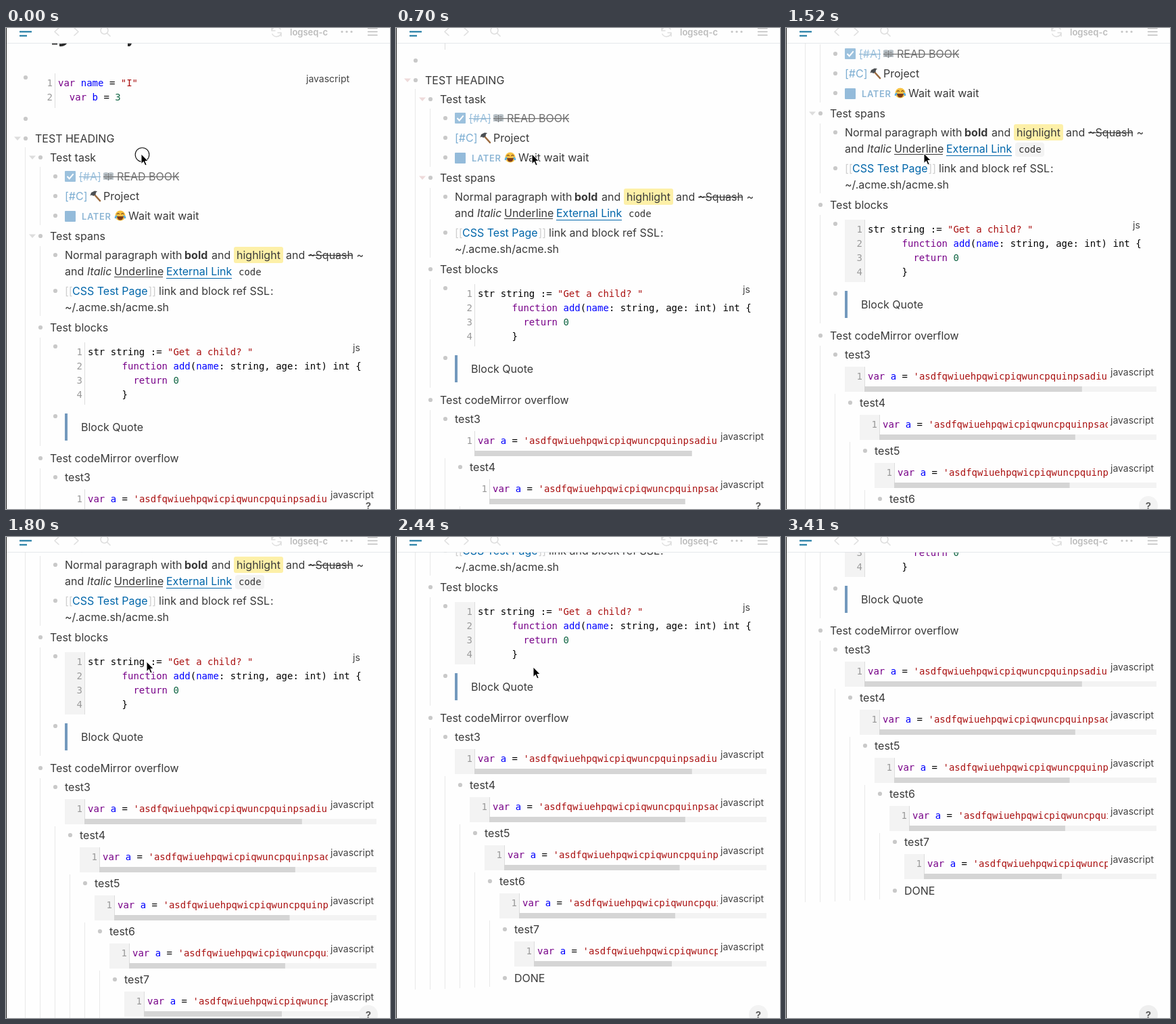
An HTML page for the animation above (3.95 s loop, 568x710 px).

```html
<!DOCTYPE html>
<html lang="en">
<head>
<meta charset="utf-8">
<title>Outline scroll</title>
<style>
  html, body { margin: 0; width: 100%; height: 100%; overflow: hidden; background: #fefefe; }
  svg { display: block; width: 568px; height: 710px; }
  text { white-space: pre; font: 16px Inter, sans-serif; fill: #3a3a3a; }
  .code { font: 14px "DejaVu Sans Mono", monospace; fill: #000; }
  .num { fill: #999; }
  .k { fill: #708; }
  .d { fill: #00f; }
  .s { fill: #a11; }
  .n { fill: #164; }
  .lang { font-size: 14px; fill: #444; }
  .link { fill: #06a; }
  .tag { fill: #7badd2; }
  .done { fill: #9cc1dd; }
  .dim { fill: #6f6f6f; }
  .faint { fill: #cfcfcf; }
  .bold { font-weight: 700; }
  .ital { font-style: italic; }
  .later { font-size: 13px; font-weight: 600; letter-spacing: .6px; fill: #8db6d5; }
  .soft { fill: none; }
  .shaded .soft { fill: #f3f3f3; }
  .fold { fill: #ddd; }
  .pink .fold { fill: #eedada; }
</style>
</head>
<body>
<svg id="stage" viewBox="0 0 568 710">
  <rect width="568" height="710" fill="#fefefe"/>
  <g id="page"></g>
  <g id="bar" fill="none" stroke-width="1.5" stroke-linecap="round" stroke-linejoin="round">
    <rect width="568" height="22" fill="#fefefe"/>
    <rect y="22" width="568" height="1" fill="#dfe3e6" fill-opacity=".8"/>
    <path d="M20 5.5H38M20 11.5H31" stroke="#0f719b" stroke-width="2" stroke-linecap="butt"/>
    <g stroke="#dedede">
      <path d="M78 0L72 5.5L78 11M101 0L107 5.5L101 11"/>
      <circle cx="145.5" cy="3.5" r="5.5"/>
      <path d="M149.5 7.5L154 12"/>
      <path d="M393 4A7 7 0 0 1 406 2M407 7A7 7 0 0 1 394 9M393 -1V4H398M407 12V7H402"/>
    </g>
    <text x="420" y="11" style="font-size:13px;font-weight:600;fill:#bcbcbc">logseq-c</text>
    <g fill="#c6c6c6"><circle cx="497" cy="5.5" r="1.6"/><circle cx="504" cy="5.5" r="1.6"/><circle cx="511" cy="5.5" r="1.6"/></g>
    <path d="M535.5 .5H549M535.5 5.5H549M535.5 10.5H549" stroke="#bdbdbd"/>
  </g>
  <circle id="help" class="soft" cx="536" cy="705" r="14"/>
  <text x="536" y="711" text-anchor="middle" class="bold" style="font-size:15px;fill:#666">?</text>
  <rect width="1" height="710" fill="#222"/>
  <circle id="ring" cx="201.5" cy="187" r="10.3" fill="none" stroke="#111" stroke-width="1.1"/>
  <path id="cursor" d="M0 0V14.6L3.4 11.4L5.8 17L8.2 16L5.8 10.5H10.2Z" fill="#000" stroke="#fff" stroke-width="1"/>
</svg>
<script>
const $ = id => document.getElementById(id);
const parts = [];
const add = s => parts.push(s);

const rect = (x, y, w, h, fill, extra = '') =>
  add(`<rect x="${x}" y="${y}" width="${w}" height="${h}" fill="${fill}" ${extra}/>`);
const soft = (x, y, w, h, r = 0) =>
  add(`<rect class="soft" x="${x}" y="${y}" width="${w}" height="${h}" rx="${r}"/>`);
// y is the middle of the capitals
const text = (x, y, s, cls = '') => add(`<text x="${x}" y="${y + 6}" class="${cls}">${s}</text>`);
const lang = (x, y, s) => add(`<text x="${x}" y="${y + 5}" class="lang">${s}</text>`);
const code = (x, y, s, extra = '') => {
  const html = s.replace(/\{(\w):([^}]*)\}/g, '<tspan class="$1">$2</tspan>');
  add(`<text x="${x}" y="${y + 5}" class="code" ${extra}>${html}</text>`);
};
const bullet = (x, y) => add(`<circle cx="${x}" cy="${y}" r="3.1" fill="#c9c9c9"/>`);
const fold = (x, y) => add(`<path class="fold" d="M${x - 5} ${y - 2.5}h10l-5 5.5z"/>`);
const guide = (x, y1, y2) => rect(x, y1, 1, y2 - y1, '#e8e8e8');
const item = (level, y, s) => {
  bullet(29 + 22 * level, y);
  if (s) text(43 + 22 * level, y, s);
};
const gutter = (x, y, h, lines) => {
  soft(x, y, 29, h);
  rect(x + 29, y, 1, h, '#ddd');
  for (let i = 0; i < lines; i++)
    add(`<text class="code num" x="${x + 17.5}" y="${y + 19 + 21 * i}">${i + 1}</text>`);
};

function buildPage() {
  add('<clipPath id="cut"><rect width="476" height="1100"/></clipPath>');
  // lower edge of the page title
  add('<path d="M68 22h8v2.5h-8zM79 27q9 1 12-6h-5q-1 3-7 2zM180 21h6q0 4-3 6h-3z" fill="#2c2c2c"/>');

  guide(28, 176, 1036);
  guide(50, 205, 291);
  guide(50, 322, 425);
  guide(50, 457, 617);
  guide(50, 650, 1036);
  for (let k = 0; k < 4; k++) guide(72 + 22 * k, 721 + 71 * k, 1035 - k);

  item(0, 73);
  gutter(43, 67, 51, 2);
  code(77, 81, '{k:var} {d:name} = {s:"I"}');
  code(77, 102, '  {k:var} {d:b} = {n:3}');
  lang(444, 75, 'javascript');
  item(0, 134);
  fold(17, 163);
  item(0, 163, 'TEST HEADING');

  fold(39, 191);
  item(1, 191, 'Test task');
  item(2, 219);
  rect(87, 211, 16, 16, '#9cc1dd', 'rx="1"');
  add('<path d="M90.5 219l3.2 3.4l6-7" fill="none" stroke="#fff" stroke-width="2"/>');
  text(108, 219, '[#A]', 'done');
  add('<path d="M144 214q4-2 7.5 0q4-2 7.5 0v10q-4-1-7.5 1q-4-2-7.5-1z" fill="#b9c2c8"/>');
  add('<path d="M151.5 214v11M146 217h4M153 217h4M146 222h4M153 222h4" stroke="#777" stroke-width="1"/>');
  text(164, 219, 'READ BOOK', 'dim');
  rect(108, 219, 32, 1.2, '#8fb5d0');
  rect(144, 219, 112, 1.2, '#6f6f6f');

  item(2, 248);
  text(87, 248, '[#C]', 'tag');
  add('<path d="M129.5 244.5L139 255" stroke="#9c6b3f" stroke-width="2.6" stroke-linecap="round"/>');
  add('<path d="M124.5 247.5L126 243L131 240.5L135 241L133 243L132.5 246L129 248L127 246.5Z" fill="#4c4f52"/>');
  text(144, 248, 'Project');

  item(2, 277);
  rect(87, 270, 16, 16, '#94bbda', 'rx="1"');
  add('<text x="112" y="283" class="later">LATER</text>');
  add('<circle cx="169" cy="277" r="7.6" fill="#f6c142"/>');
  add('<path d="M164 278h10q-1 5.5-5 5.5t-5-5.5z" fill="#7a3d1c"/>');
  add('<path d="M164 275q2-3 3.5 0M170.5 275q2-3 3.5 0" fill="none" stroke="#6b3c1c" stroke-width="1.2"/>');
  add('<path d="M164.5 276q-5 2-3.5 5q3 1 3.5-5M173.500 276q5 2 3.5 5q-3 1-3.500-5" fill="#54aee4"/>');
  text(181, 277, 'Wait wait wait');

  fold(39, 307);
  item(1, 307, 'Test spans');
  item(2, 335, 'Normal paragraph with');
  text(264, 335, 'bold', 'bold');
  text(304, 335, 'and');
  rect(337, 323, 73, 24, '#fdf0a8', 'rx="3"');
  text(341, 335, 'highlight');
  text(414, 335, 'and');
  text(447, 335, '~Squash');
  rect(447, 335, 66, 1.2, '#3a3a3a');
  text(518.5, 335, '~');
  text(87, 359, 'and');
  text(120, 359, 'Italic', 'ital');
  text(160, 359, 'Underline');
  rect(160, 367, 72, 1, '#3a3a3a');
  text(237, 359, 'External Link', 'link');
  rect(237, 369, 97, 1, '#06a');
  soft(339, 350, 43, 21, 4);
  code(344, 360, 'code', 'style="fill:#333"');

  item(2, 388);
  text(87, 388, '[[', 'faint');
  text(98, 388, 'CSS Test Page', 'link');
  text(210.5, 388, ']]', 'faint');
  text(226, 388, 'link and block ref SSL');
  text(391, 388, ':');
  text(87, 412, '~/.acme.sh/acme.sh');

  item(1, 442, 'Test blocks');
  item(2, 470);
  gutter(87, 464, 92, 4);
  code(121, 478, 'str string := {s:"Get a child? "}');
  code(121, 499, '      {k:function} {d:add}({d:name}: string, age: int) int {');
  code(121, 520, '        {k:return} {n:0}');
  code(121, 541, '      }');
  lang(513, 472, 'js');
  item(2, 573);
  rect(87, 569, 4, 40, '#7399bd');
  text(111, 589, 'Block Quote');

  item(1, 635, 'Test codeMirror overflow');
  for (let k = 0; k < 5; k++) {
    const x = 87 + 22 * k, y = 663 + 71 * k, track = 432 - 22 * k;
    item(2 + k, y, 'test' + (3 + k));
    gutter(x, y + 18, 37, 1);
    soft(x + 29, y + 47, track, 8);
    rect(x + 29, y + 47, track * track / 580, 8, '#d5d5d5');
    code(x + 34, y + 32, "{k:var} {d:a} = {s:'asdfqwiuehpqwicpiqwuncpquinpsadiunqpwc}", 'clip-path="url(#cut)"');
    lang(480, y + 26, 'javascript');
  }
  item(6, 1019, 'DONE');
  $('page').innerHTML = parts.join('');
}

// time, scroll offset, pointer x and y (kept from the row above if absent)
const steps = [
  [0, 0, 200, 186], [60, 4, 201, 186], [120, 13], [190, 28], [270, 46], [350, 63], [440, 75], [530, 81],
  [610, 84], [700, 86],
  [880, 99], [960, 124], [1050, 148], [1140, 165], [1220, 174],
  [1520, 181, 204, 185], [1590, 201], [1660, 229, 208, 184], [1730, 263], [1800, 294], [1860, 312], [1950, 326], [2040, 335],
  [2100, 337], [2150, 339],
  [2330, 344, 203, 192], [2390, 355], [2440, 368], [2530, 390], [2620, 412, 260, 270], [2700, 430, 380, 450], [2800, 441, 452, 540],
  [2920, 446, 459, 546], [3000, 459], [3080, 471, 470, 570], [3160, 481, 490, 620], [3240, 489, 505, 670], [3330, 494, 518, 705],
  [3410, 497, 520, 740]
];
for (let i = 1; i < steps.length; i++)
  if (steps[i].length < 4) steps[i].push(steps[i - 1][2], steps[i - 1][3]);

const LOOP = 3950, SHADE_AT = 1520;
const start = performance.now();

function draw() {
  const t = (performance.now() - start) % LOOP;
  let i = steps.length - 1;
  while (steps[i][0] > t) i--;
  const [, scroll, x, y] = steps[i];
  $('page').setAttribute('transform', `translate(0 ${-scroll})`);
  $('cursor').setAttribute('transform', `translate(${x} ${y})`);
  $('ring').style.display = t < 60 ? '' : 'none';
  $('help').style.fill = t >= 3410 ? '#efefef' : '';
  $('stage').setAttribute('class', t >= SHADE_AT ? 'shaded' : t >= 60 ? 'pink' : '');
  requestAnimationFrame(draw);
}

buildPage();
draw();
</script>
</body>
</html>
```
